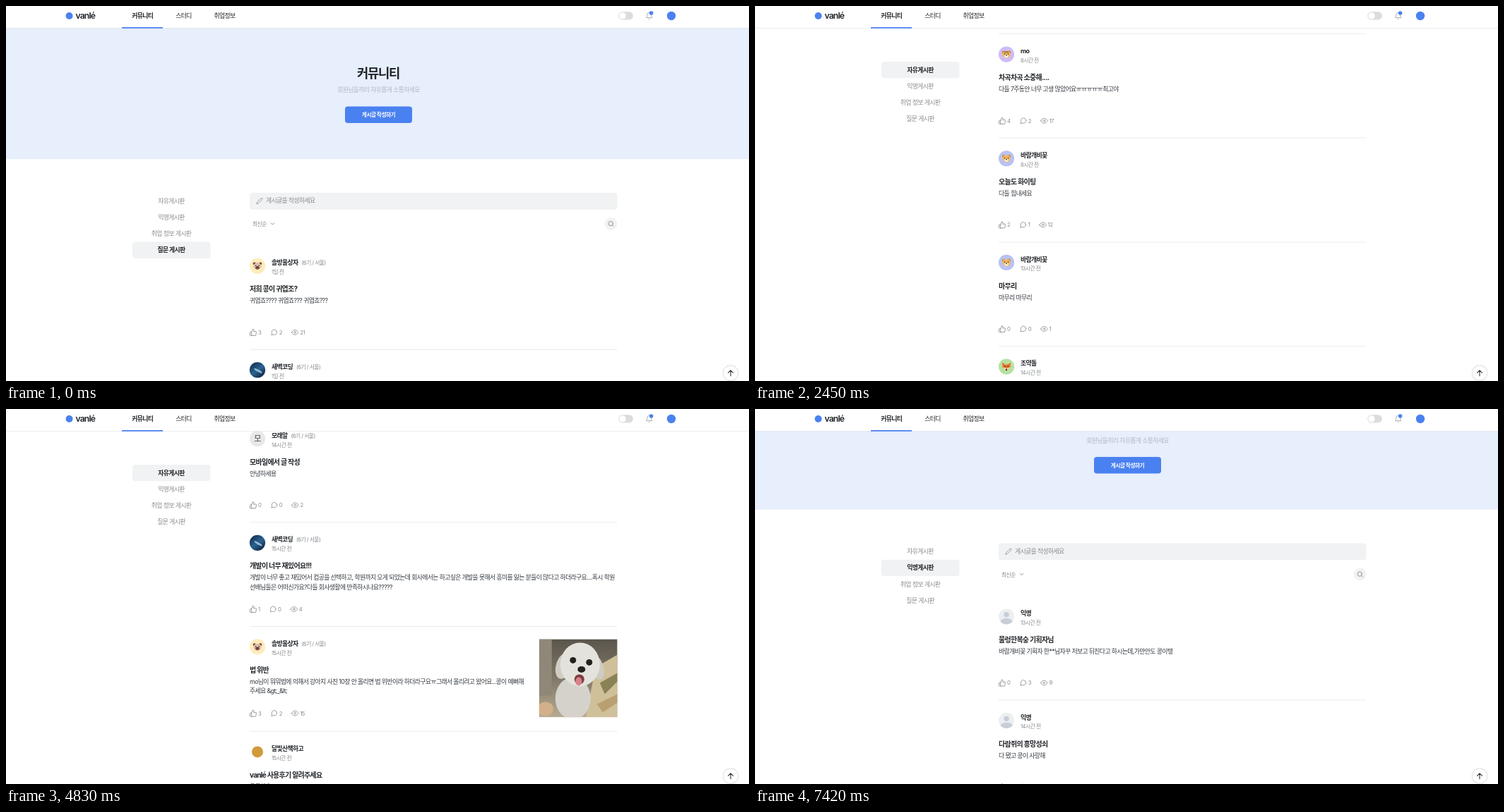
Animation of 1052x532 px, one loop 8000 ms. Source, as an HTML page with a canvas:

```html
<!DOCTYPE html>
<html lang="ko">
<head>
<meta charset="utf-8">
<title>커뮤니티</title>
<style>
html, body { margin: 0; width: 100%; height: 100%; overflow: hidden; background: #fff; }
canvas { display: block; width: 1052px; height: 532px; }
</style>
</head>
<body>
<canvas id="stage"></canvas>
<script>
const W = 1052, H = 532, LOOP = 8000, STEP = 70;
const canvas = document.getElementById('stage');
const ctx = canvas.getContext('2d');
const dpr = window.devicePixelRatio || 1;
canvas.width = W * dpr;
canvas.height = H * dpr;

const FONT = 'Inter, "Noto Sans CJK KR", "Noto Sans CJK", sans-serif';
const INK = '#212529', GREY = '#868a8f', BLUE = '#4a81f0', PANEL = '#f1f2f3';
const SMALL = 7.75, BASE = 8.86, LARGE = 9.96;

const ICON = {
  like: 'M14 9V5a3 3 0 0 0-3-3l-4 9v11h11.3a2 2 0 0 0 2-1.7l1.4-9a2 2 0 0 0-2-2.3zM7 22H4a2 2 0 0 1-2-2v-7a2 2 0 0 1 2-2h3',
  talk: 'M21 11.5a8.4 8.4 0 0 1-.9 3.8 8.5 8.5 0 0 1-7.6 4.7 8.4 8.4 0 0 1-3.8-.9L3 21l1.9-5.7a8.4 8.4 0 0 1-.9-3.8 8.5 8.5 0 0 1 4.7-7.6 8.4 8.4 0 0 1 3.8-.9h.5a8.5 8.5 0 0 1 8 8z',
  eye: 'M1 12s4-8 11-8 11 8 11 8-4 8-11 8S1 12 1 12zM15 12a3 3 0 1 1-6 0 3 3 0 0 1 6 0z',
  pen: 'M17 3a2.8 2.8 0 1 1 4 4L7.5 20.5 2 22l1.5-5.5z',
  bell: 'M18 8A6 6 0 0 0 6 8c0 7-3 9-3 9h18s-3-2-3-9M13.7 21a2 2 0 0 1-3.4 0',
  search: 'M19 11a8 8 0 1 1-16 0 8 8 0 0 1 16 0zM21 21l-4.3-4.3',
  up: 'M12 20V4M5 11l7-7 7 7',
  down: 'M6 9l6 6 6-6'
};
for (const k in ICON) ICON[k] = new Path2D(ICON[k]);

const clamp = x => Math.max(0, Math.min(1, x));

function rect(x, y, w, h, color, r = 0) {
  ctx.fillStyle = color;
  ctx.beginPath();
  ctx.roundRect(x, y, w, h, r);
  ctx.fill();
}

function oval(x, y, rx, ry, color, turn = 0) {
  ctx.fillStyle = color;
  ctx.beginPath();
  ctx.ellipse(x, y, rx, ry, turn, 0, 7);
  ctx.fill();
}

const disc = (x, y, r, color) => oval(x, y, r, r, color);

function poly(color, ...p) {
  ctx.fillStyle = color;
  ctx.beginPath();
  for (let i = 0; i < p.length; i += 2) ctx.lineTo(p[i], p[i + 1]);
  ctx.fill();
}

function fade(x0, y0, x1, y1, ...colors) {
  const g = ctx.createLinearGradient(x0, y0, x1, y1);
  colors.forEach((c, i) => g.addColorStop(i / (colors.length - 1), c));
  return g;
}

// Draws text centred vertically on y and returns its width.
function text(s, x, y, size, color = INK, weight = 400, align = 'left') {
  ctx.font = `${weight} ${size}px ${FONT}`;
  ctx.letterSpacing = -0.07 * size + 'px';
  ctx.textAlign = 'left';
  ctx.fillStyle = color;
  const w = ctx.measureText(s).width;
  ctx.fillText(s, align === 'center' ? x - w / 2 : x, y + size * 0.37);
  return w;
}

function icon(name, x, y, size, color = GREY, line = 1.9) {
  ctx.save();
  ctx.translate(x - size / 2, y - size / 2);
  ctx.scale(size / 24, size / 24);
  ctx.strokeStyle = color;
  ctx.lineWidth = line;
  ctx.lineCap = ctx.lineJoin = 'round';
  ctx.stroke(ICON[name]);
  ctx.restore();
}

// Avatars, drawn around the origin
function face(bg, fur, ear, snout) {
  disc(0, 0, 11.1, bg);
  disc(-4.2, -3.2, 2, ear);
  disc(4.2, -3.2, 2, ear);
  oval(0, 0.2, 5.5, 5, fur);
  oval(0, 2.4, 2.8, 2.3, snout);
  disc(-2.4, -0.6, 0.8, '#33261f');
  disc(2.4, -0.6, 0.8, '#33261f');
  oval(0, 1.4, 1.1, 0.8, '#33261f');
}

const avatars = {
  pup: () => face('#feecbb', '#dcc0ad', '#6b4034', '#7b4b40'),
  bear: () => face('#b9c2f3', '#f2b75c', '#d8913c', '#fdeed2'),
  tiger() {
    face('#cfbcf5', '#f3b84f', '#c88a35', '#fff3e0');
    for (const x of [-2, 0, 2]) rect(x - 0.4, -4.6, 0.8, 2.4, '#4a3220');
  },
  fox() {
    disc(0, 0, 11.1, '#b6e2a1');
    poly('#e8752c', -6, -6, -2, -3, 2, -3, 6, -6, 5.5, 1, 0, 6, -5.5, 1);
    poly('#fbe3c8', -5, 1, -1, 2, 0, 6);
    poly('#fbe3c8', 5, 1, 1, 2, 0, 6);
    disc(-2.2, -0.2, 0.8, '#33261f');
    disc(2.2, -0.2, 0.8, '#33261f');
    disc(0, 4.6, 1.1, '#33261f');
  },
  night() {
    disc(0, 0, 11.1, fade(-8, -10, 8, 11, '#123055', '#2c628f', '#0b1d3a'));
    oval(1, 1, 6.5, 1.6, '#8db8d6', 0.5);
  },
  letter() {
    disc(0, 0, 11.1, '#e8e8e8');
    text('모', 0, 0, 11, '#444', 400, 'center');
  },
  gold: () => disc(0, 0, 8, '#d29a3a'),
  anon() {
    ctx.save();
    ctx.beginPath();
    ctx.arc(0, 0, 11.1, 0, 7);
    ctx.clip();
    disc(0, 0, 11.1, '#eceef0');
    disc(0, -2.6, 3.6, '#c6ced6');
    oval(0, 8, 8.8, 5.2, '#c6ced6');
    ctx.restore();
  }
};

// Photos, drawn in a 110.7 unit square
const photos = {
  samoyed() {
    rect(0, 0, 111, 111, fade(0, 0, 111, 0, '#4a3f3a', '#2a1f1c', '#1e1512'));
    poly('#dcd7d2', 0, 111, 4, 84, 20, 52, 92, 52, 105, 78, 108, 111);
    poly('#e4dfda', 23, 52, 33, 12, 42, 13, 58, 28);
    poly('#e4dfda', 62, 26, 80, 11, 87, 14, 95, 52);
    oval(59, 56, 38, 38, '#edeae6');
    oval(57, 84, 33, 27, '#e6e2dd');
    oval(58, 84, 15, 19, '#4a2c2c');
    oval(58, 90, 9.5, 13, '#c98791');
    oval(62, 55, 8, 6.5, '#2a2526');
    oval(44, 46, 5, 1.6, '#3a302e', -0.3);
    oval(77, 46, 5, 1.6, '#3a302e', 0.3);
  },
  maltese() {
    rect(0, 0, 111, 111, fade(0, 0, 0, 111, '#5a554c', '#807767', '#b8ab93'));
    rect(0, 0, 18, 80, '#8f8878');
    poly('#cfc09a', 80, 40, 111, 22, 111, 111, 66, 111);
    poly('#8a8257', 86, 62, 111, 48, 111, 60, 93, 78);
    poly('#b9a070', 82, 92, 111, 78, 111, 90, 90, 104);
    oval(9, 99, 11, 10, '#d3b08a');
    oval(48, 84, 25, 30, '#d4d2cb');
    oval(35, 38, 11, 19, '#cfccc4', 0.3);
    oval(82, 40, 9, 18, '#cfccc4', -0.3);
    oval(58, 36, 28, 31, '#e4e2dc');
    disc(48, 30, 4.5, '#26211f');
    disc(71, 33, 4.5, '#26211f');
    oval(60, 43, 5.5, 4.5, '#26211f');
    oval(57, 57, 7, 7, '#7c3f42');
    oval(56, 60, 4.5, 6, '#d8818a');
  }
};

const post = (face, name, time, title, body, stats, more = {}) =>
  ({ face, name, time, title, body: body.split('\n'), stats, ...more });
const GROUP = { group: '(6기 / 서울)' };

const boards = {
  ask: [
    post('pup', '솔방울상자', '1일 전', '저희 콩이 귀엽조?', '귀엽죠???? 귀엽죠??? 귀엽죠???', [3, 2, 21], GROUP),
    post('night', '새벽코딩', '1일 전', '질문이 있어요', '궁금합니다', [1, 2, 14], GROUP)
  ],
  free: [
    post('bear', '바람개비꽃', '8시간 전', '강아지 자랑이 유행인가요?', '커다랗고 귀여운 저희 집 사모예드입니다 ㅇ3ㅇ', [3, 3, 57], { photo: 'samoyed' }),
    post('tiger', 'mo', '8시간 전', '차곡차곡 소중해....', '다들 7주동안 너무 고생 많았어요ㅠㅠㅠㅠㅠ최고야', [4, 2, 17]),
    post('bear', '바람개비꽃', '8시간 전', '오늘도 화이팅', '다들 힘내세요', [2, 1, 12]),
    post('bear', '바람개비꽃', '13시간 전', '마무리', '마무리 마무리', [0, 0, 1]),
    post('fox', '조약돌', '14시간 전', '우왕', ':)', [2, 1, 27]),
    post('letter', '모래알', '14시간 전', '모바일에서 글 작성', '안녕하세용', [0, 0, 2], GROUP),
    post('night', '새벽코딩', '15시간 전', '개발이 너무 재밌어요!!!', '개발이 너무 좋고 재밌어서 컴공을 선택하고, 학원까지 오게 되었는데 회사에서는 하고싶은 개발을 못해서 흥미를 잃는 분들이 많다고 하더라구요....혹시 학원\n선배님들은 어떠신가요?다들 회사생활에 만족하시나요?????', [1, 0, 4], GROUP),
    post('pup', '솔방울상자', '15시간 전', '법 위반', 'mo님이 뭐뭐법에 의해서 강아지 사진 10장 안 올리면 법 위반이라 하더라구요ㅠ그래서 올리려고 왔어요...콩이 예뻐해\n주세요 &gt;_&lt;', [3, 2, 15], { ...GROUP, photo: 'maltese' }),
    post('gold', '달빛산책하고', '15시간 전', 'vanlé 사용후기 알려주세요', '궁금해요', [2, 3, 20])
  ],
  anon: [
    post('anon', '익명', '13시간 전', '물렁한복숭 기획자님', '바람개비꽃 기획자 한**님자꾸 저보고 뒤진다고 하시는데,가만안도 콩이탱', [0, 3, 9]),
    post('anon', '익명', '14시간 전', '다람쥐의 흥망성쇠', '다 됐고 콩이 사랑해', [0, 1, 5])
  ]
};

function drawPost(p, y) {
  ctx.save();
  ctx.translate(356, y);
  avatars[p.face]();
  ctx.restore();
  const w = text(p.name, 376, y - 4.7, BASE, INK, 700);
  if (p.group) text(p.group, 376 + w + 5, y - 4.5, SMALL, GREY);
  text(p.time, 376, y + 8.5, SMALL, GREY);
  text(p.title, 345, y + 33, LARGE, INK, 700);
  p.body.forEach((s, i) => text(s, 345, y + 49.4 + i * 13.2, BASE, '#343a40'));
  let x = 345;
  ['like', 'talk', 'eye'].forEach((name, i) => {
    icon(name, x + 5, y + 94.2, i ? 10.4 : 11);
    x += 12 + text(String(p.stats[i]), x + 12, y + 94.3, SMALL, GREY) + 13.4;
  });
  if (p.photo) {
    ctx.save();
    ctx.translate(754.8, y - 11);
    ctx.beginPath();
    ctx.rect(0, 0, 110.7, 110.7);
    ctx.clip();
    photos[p.photo]();
    ctx.restore();
  }
  rect(345, y + (p.photo ? 119.2 : 118.2), 520.5, 1, '#e9ebee');
}

function drawList(list, scroll) {
  let y = 368.8 - scroll;
  for (const p of list) {
    if (y > -130 && y < H + 15) drawPost(p, y);
    y += p.photo ? 149 : 147.65;
  }
}

function drawHero(s) {
  rect(0, 31 - s, W, 186.3, '#e7eefc');
  text('커뮤니티', 527, 95 - s, 17.7, INK, 700, 'center');
  text('회원님들끼리 자유롭게 소통하세요', 527.5, 119 - s, BASE, '#b0b8c6', 400, 'center');
  rect(480, 142.6 - s, 95, 23.4, BLUE, 4);
  text('게시글 작성하기', 527.5, 154.3 - s, SMALL, '#fff', 700, 'center');
}

function drawTools(s) {
  rect(345, 265 - s, 520.5, 23.8, PANEL, 4);
  icon('pen', 359, 276.6 - s, 10);
  text('게시글을 작성하세요', 368, 276.2 - s, BASE, GREY);
  text('최신순', 349, 309.2 - s, SMALL, GREY);
  icon('down', 377.5, 309 - s, 9, GREY, 2.4);
  disc(856.6, 309 - s, 9, PANEL);
  icon('search', 856.6, 309 - s, 9.5, GREY, 2.2);
}

const CLICKS = [{ at: 1190, from: 3, to: 0 }, { at: 6440, from: 0, to: 1 }];

function drawMenu(t, s) {
  const top = Math.max(79, 265 - s);
  const click = CLICKS[t < CLICKS[1].at ? 0 : 1];
  const p = t < click.at ? 0 : clamp((t - click.at + STEP) / 280);
  ['자유게시판', '익명게시판', '취업 정보 게시판', '질문 게시판'].forEach((label, i) => {
    const on = i === click.from ? 1 - p : i === click.to ? clamp((p - 0.25) / 0.75) : 0;
    const hover = i === 0 && t < 6440 ? clamp((t - 770) / 140)
      : i === 1 ? clamp((t - 6020) / 140) : 0;
    const y = top + i * 23.2;
    if (on) {
      ctx.globalAlpha = on;
      rect(179, y, 110.5, 23.3, PANEL, 4);
      ctx.globalAlpha = 1;
    }
    const c = Math.round(138 - 104 * Math.max(hover, clamp(on * 1.3)));
    text(label, 234, y + 11.4, BASE, `rgb(${c},${c + 2},${c + 4})`, 400 + Math.round(on * 3) * 100, 'center');
  });
}

function drawHeader() {
  rect(0, 0, W, 31, '#fff');
  rect(0, 31, W, 0.8, '#e3e6ea');
  disc(89.6, 14, 5, BLUE);
  text('vanlé', 98.5, 13.4, 12.2, INK, 600);
  text('커뮤니티', 193.3, 13.5, BASE, INK, 700, 'center');
  text('스터디', 251.5, 13.5, BASE, INK, 400, 'center');
  text('취업정보', 309.5, 13.5, BASE, INK, 400, 'center');
  rect(164, 30, 58, 1.7, BLUE);
  rect(867.3, 8.2, 20.5, 11.4, '#dcdcdc', 5.7);
  disc(873, 13.9, 4.7, '#fff');
  icon('bell', 910.7, 14.2, 11.5, '#a0a4a8');
  disc(913.6, 10, 2.8, BLUE);
  disc(942, 14, 6.2, BLUE);
}

function drawTopButton() {
  disc(1026, 520.7, 11.2, '#d5d7da');
  disc(1026, 520.7, 10.5, '#fff');
  icon('up', 1026, 520.8, 12, '#2b2f33', 2.2);
}

const BOTTOM = 1075;
const SWIPE = [
  [1820, 0], [1890, 14], [1960, 42], [2030, 80.7], [2300, 320], [2660, 630],
  [3010, 829.8], [3220, 905], [3360, 925], [3430, 925], [3570, 965], [3710, 1052.4], [3850, BOTTOM]
];

function scrollAt(t) {
  if (t >= 6930) {
    const x = clamp((t - 6930) / 490);
    return 74.5 * (1 - (1 - x) ** 2);
  }
  if (t >= 4790) return BOTTOM * (1 + Math.cos(Math.PI * clamp((t - 4790) / 696))) / 2;
  const i = SWIPE.findIndex(k => k[0] > t);
  if (i === 0) return 0;
  if (i < 0) return BOTTOM;
  const [t0, s0] = SWIPE[i - 1], [t1, s1] = SWIPE[i];
  return s0 + (s1 - s0) * (t - t0) / (t1 - t0);
}

function draw(t) {
  const s = scrollAt(t);
  ctx.setTransform(dpr, 0, 0, dpr, 0, 0);
  rect(0, 0, W, H, '#fff');
  if (s < 187) drawHero(s);
  if (s < 320) drawTools(s);
  drawList(t < 1190 ? boards.ask : t < 6440 ? boards.free : boards.anon, s);
  drawMenu(t, s);
  drawHeader();
  drawTopButton();
}

const start = performance.now();
function tick() {
  const t = (performance.now() - start) % LOOP;
  draw(Math.floor(t / STEP) * STEP);
  requestAnimationFrame(tick);
}
tick();
</script>
</body>
</html>
```
